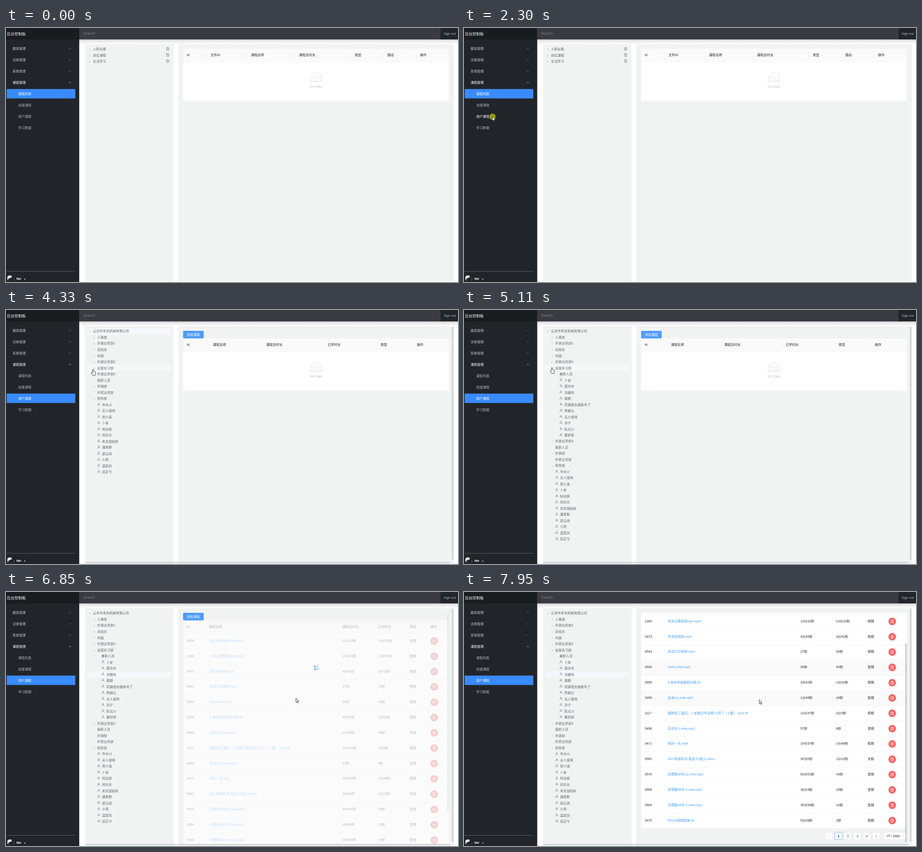
Animation, 998 px wide and 561 px high, one loop 8000 ms. Source, as an HTML page with a canvas:

```html
<!DOCTYPE html>
<html lang="zh-CN">
<head>
<meta charset="utf-8">
<title>后台控制板</title>
<style>
html, body { margin: 0; width: 100%; height: 100%; overflow: hidden; background: #fff; }
canvas { display: block; }
</style>
</head>
<body>
<canvas id="stage" width="998" height="561"></canvas>
<script>
const ctx = document.getElementById('stage').getContext('2d');
const LOOP = 8000;
const FONT = '"Liberation Sans", "Noto Sans CJK SC", "Noto Sans CJK", sans-serif';
const PAGE_SWITCH = 2360, TREE_READY = 2500, LOAD_START = 6180, DATA_READY = 6300, LOAD_END = 6910;
const ROW = 33.83, TREE_ROW = 13.52, TABLE_LEFT = 391, TABLE_RIGHT = 978;

const MENU = ['题库管理', '试卷管理', '答卷管理', '课程管理'];
const SUBMENU = ['课程列表', '创建课程', '用户课程', '学习数据'];

// Prefix: ">" has an arrow, "@" is a person, "-" is a plain node.
const DEPTS_TOP = ['>人事部', '>外销业务部1', '>总经办', '>内销', '>外销业务部2', '>运营实习部'];
const DEPTS_REST = ['>外销业务部3', '-离职人员', '>外销部', '-外贸业务部', '>财务部',
  '@岑木川', '@无人使用', '@贺小溪', '@卜安', '@柯远帆', '@闵乐乐', '@禾岚邹知秋',
  '@蒲青野', '@邵云阔', '@小荷', '@温若岚', '@田芷兮'];
const INTERNS = ['-兼职人员', '@卜安', '@龚亦舟', '@洪鹿鸣', '@裘朗', '@花姨借去做账号了',
  '@佟越山', '@无人使用', '@涂宁', '@阮北川', '@霍舒原'];

const COURSES = `3508|枕式和彩泥机.m4a.mp3|12分12秒|12分12秒|音频
1280|禾岚云鹭使用mp4.mp4|13分32秒|13分32秒|视频
3473|禾岚首视频.mp4|4分45秒|4分42秒|视频
3543|禾岚打印视频.mp4|27秒|26秒|视频
3500|Ovek.m4a.mp3|36秒|34秒|音频
3555|6.报关的金额和台数.flv|3分42秒|1分32秒|视频
3499|朵米(1).m4a.mp3|1分48秒|43秒|音频
1117|摆脱丢三落四，一定要记牢这两个窍门（上集）.mp3.flv|12分47秒|2分3秒|视频
3496|苏苏5(1).m4a.mp3|57秒|8秒|音频
3471|我的一天.mp4|19分37秒|1分48秒|视频
3561|002 快速拓词-发品-升星(1).docx|30分0秒|1分10秒|文档
3570|岚鹭路36号(1).m4a.mp3|56分51秒|43秒|音频
3569|岚鹭路36号 3.m4a.mp3|36分3秒|23秒|音频
3564|岚鹭路36号 5.m4a.mp3|39分56秒|16秒|音频
3476|PDCA逻辑思维.flv|5分28秒|2秒|视频`.split('\n').map(line => line.split('|'));

const LIST_COLS = [['Id', 399], ['文件ID', 451.5], ['课程名称', 541], ['课程总时长', 647],
  ['类型', 770], ['路径', 842], ['操作', 914]];
const EMPTY_COLS = [['Id', 399], ['课程名称', 457], ['课程总时长', 574.5], ['已学时长', 710],
  ['类型', 827], ['操作', 907]];
const DATA_COLS = [['Id', 399], ['课程名称', 448], ['课程总时长', 742.8], ['已学时长', 821.5],
  ['类型', 891], ['操作', 937]];

// Pointer moves: start, end, x, y
const MOVES = [[530, 860, 497, 324], [1320, 2100, 63, 196], [2500, 2920, 272, 62],
  [2920, 3280, 185, 44], [3930, 4330, 192, 131], [4450, 4650, 194, 127],
  [5380, 5920, 236, 181], [6480, 6910, 656, 237], [7240, 7370, 652, 238]];
const CLICKS = [[2160, 2360], [3410, 3540], [4780, 4900], [6120, 6240]];

const ARROW = new Path2D('M0 0V9L2.1 7.1 3.6 10.4 5 9.8 3.6 6.5H6.2Z');
const HAND = new Path2D('M-1.2 .8Q0-.6 1.2 .8V4.8L5 5.6Q6.4 6 6 8.2L5 11V13.2H-.8L-3.2 9Q-4 7-2.6 7L-1.2 8.4Z');
const TRAY_BACK = new Path2D('M55 13 44.5 1Q43.5 0 42.5 0H21.5Q20.5 0 19.5 1L9 13V22H55Z');
const TRAY_FRONT = new Path2D('M41.6 16Q41.6 13 44 13H55V31Q55 35 52 35H12Q9 35 9 31V13H20Q22.4 13 22.4 16T24.6 18.8H39.4Q41.6 18.8 41.6 16Z');

const clamp = v => Math.max(0, Math.min(1, v));
const ease = p => p < .5 ? 2 * p * p : 1 - 2 * (1 - p) * (1 - p);
const ramp = (t, start, length) => clamp((t - start) / length);

function rect(x, y, w, h, color) {
  ctx.fillStyle = color;
  ctx.fillRect(x, y, w, h);
}

function box(x, y, w, h, r, fill, border) {
  ctx.beginPath();
  ctx.roundRect(x, y, w, h, r);
  ctx.fillStyle = fill;
  ctx.fill();
  if (border) stroke(border, .6);
}

function stroke(color, width, path) {
  ctx.strokeStyle = color;
  ctx.lineWidth = width;
  path ? ctx.stroke(path) : ctx.stroke();
}

function line(color, width, ...points) {
  ctx.beginPath();
  for (let i = 0; i < points.length; i += 2) ctx.lineTo(points[i], points[i + 1]);
  stroke(color, width);
}

function disc(x, y, r, color) {
  ctx.beginPath();
  ctx.arc(x, y, r, 0, 7);
  ctx.fillStyle = color;
  ctx.fill();
}

function text(str, x, cy, color, size = 7.28, align = 'left', weight = '') {
  ctx.font = `${weight} ${size}px ${FONT}`;
  ctx.textAlign = align;
  ctx.fillStyle = color;
  ctx.fillText(str, x, cy + size * .36);
}

function clipped(x, y, w, h, draw) {
  ctx.save();
  ctx.beginPath();
  ctx.rect(x, y, w, h);
  ctx.clip();
  draw();
  ctx.restore();
}

function chevron(x, y, up, color, w = 2.4) {
  const d = up ? -w / 2 : w / 2;
  line(color, .8, x - w, y - d, x, y + d, x + w, y - d);
}

function triangle(x, y, turn, color, r = 1.8) {
  ctx.save();
  ctx.translate(x, y);
  ctx.rotate(turn * Math.PI / 2);
  ctx.beginPath();
  ctx.moveTo(-r * .6, -r);
  ctx.lineTo(r * .7, 0);
  ctx.lineTo(-r * .6, r);
  ctx.fillStyle = color;
  ctx.fill();
  ctx.restore();
}

function trash(x, y, color) {
  line(color, .7, x - 3.1, y - 2, x + 3.1, y - 2);
  line(color, .7, x - 1.2, y - 2, x - 1.2, y - 3.2, x + 1.2, y - 3.2, x + 1.2, y - 2);
  line(color, .7, x - 2.4, y - 2, x - 2.4, y + 3.1, x + 2.4, y + 3.1, x + 2.4, y - 2);
  line(color, .6, x - .8, y - .4, x - .8, y + 1.6);
  line(color, .6, x + .8, y - .4, x + .8, y + 1.6);
}

function person(x, y) {
  ctx.beginPath();
  ctx.arc(x, y - 1.4, 1.6, 0, 7);
  stroke('#6b6d71', .65);
  ctx.beginPath();
  ctx.arc(x, y + 3, 2.8, Math.PI, 0);
  stroke('#6b6d71', .65);
}

function pointer(t) {
  let x = 892, y = 549;
  for (const [start, end, toX, toY] of MOVES) {
    const p = ease(ramp(t, start, end - start));
    x += (toX - x) * p;
    y += (toY - y) * p;
  }
  return { x, y, shown: t >= 530 };
}

function drawSidebar(t, mouse) {
  rect(0, 0, 161.7, 561, '#212529');
  rect(0, 0, 161.7, 25.3, '#191c1f');
  text('后台控制板', 2, 12.7, '#fff', 8.32);
  MENU.forEach((label, i) => {
    const y = 45 + i * 25, open = i === 3;
    text(label, 14.5, y, open ? '#fff' : '#c3c5c7');
    chevron(141, y + .3, open, open ? '#d5d6d8' : '#85888c');
  });
  const active = t < PAGE_SWITCH ? 0 : 2;
  SUBMENU.forEach((label, i) => {
    const y = 145.2 + i * 24.9;
    const hover = mouse.shown && mouse.x < 153 && Math.abs(mouse.y - y) < 10.5;
    if (i === active) rect(1.5, y - 10.4, 151.5, 20.8, '#398bff');
    text(label, 27, y, i === active || hover ? '#fff' : '#b3b5b7');
  });
  rect(1.5, 537.3, 151.5, .7, '#75787b');
  ctx.beginPath();
  ctx.moveTo(3, 557);
  ctx.lineTo(3, 550);
  ctx.quadraticCurveTo(4, 546.5, 8, 546.5);
  ctx.lineTo(12.5, 547);
  ctx.lineTo(12.5, 551);
  ctx.quadraticCurveTo(6, 552, 3, 557);
  ctx.fillStyle = '#e4e7e6';
  ctx.fill();
  line('#8c9093', .8, 3, 557, 8, 556.5);
  text('|', 17, 554.5, '#b9bbbd', 6);
  text('tav', 23, 553.5, '#fff', 7.28, 'left', 'bold');
  triangle(41.5, 554.7, 1, '#fff', 1.7);
}

function drawTopbar() {
  const shade = ctx.createLinearGradient(0, 25, 0, 37);
  shade.addColorStop(0, 'rgba(20,20,40,.17)');
  shade.addColorStop(.5, 'rgba(20,20,40,.06)');
  shade.addColorStop(1, 'rgba(20,20,40,0)');
  rect(161.7, 25, 837, 12, shade);
  rect(161.7, 0, 796.5, 25.3, '#393b40');
  rect(958.2, 0, 40, 25.3, '#212529');
  text('Search', 170, 12.3, '#777a7f', 8.32);
  text('Sign out', 966.3, 12, '#b5b7b9');
}

function treeRow(node, y, level, turn, mouse, focused) {
  const x = 191.9 + level * 9.36, kind = node[0];
  const hover = mouse.x > 180 && mouse.x < 365 && Math.abs(mouse.y - y) < TREE_ROW / 2;
  if (hover || focused) rect(179.5, y - TREE_ROW / 2, 185.5, TREE_ROW, '#f5f7fa');
  if (kind === '>') triangle(x - 6.3, y + .8, turn, '#b4b8c0');
  if (kind === '@') person(x + 3.5, y - .5);
  text(node.slice(1), x + (kind === '@' ? 10.8 : 0), y, '#606266');
}

function drawTree(t, mouse) {
  rect(174, 36, 196, 524, '#f1f3f3');
  const top = 46.8;
  if (t < PAGE_SWITCH) {
    ['>入职必看', '>岗位课程', '>生活学习'].forEach((node, i) => {
      treeRow(node, top + i * TREE_ROW, 0, 0, mouse);
      trash(357, top - .7 + i * TREE_ROW, '#707276');
    });
    return;
  }
  if (t < TREE_READY) return;
  const rootOpen = ease(ramp(t, 3390, 300)), internOpen = ease(ramp(t, 4825, 300));
  const focus = t < 3410 ? '' : t < 4780 ? 'root' : t < 6120 ? 'interns' : 'person';
  const innerHeight = INTERNS.length * TREE_ROW * internOpen;
  const fullHeight = (DEPTS_TOP.length + DEPTS_REST.length) * TREE_ROW + innerHeight;
  treeRow('>云沐市禾岚机械有限公司', top, 0, rootOpen, mouse, focus === 'root');
  const childTop = top + TREE_ROW / 2;
  clipped(174, childTop, 196, fullHeight * rootOpen, () => {
    DEPTS_TOP.forEach((node, i) => {
      const last = i === DEPTS_TOP.length - 1;
      treeRow(node, top + (i + 1) * TREE_ROW, 1, last ? internOpen : 0, mouse, last && focus === 'interns');
    });
    const innerTop = childTop + DEPTS_TOP.length * TREE_ROW;
    clipped(174, innerTop, 196, innerHeight, () => INTERNS.forEach((node, i) =>
      treeRow(node, innerTop + (i + .5) * TREE_ROW, 2, 0, mouse, i === 3 && focus === 'person')));
    DEPTS_REST.forEach((node, i) =>
      treeRow(node, innerTop + innerHeight + (i + .5) * TREE_ROW, 1, 0, mouse));
  });
}

function tableHeader(cols, top) {
  rect(TABLE_LEFT, top, TABLE_RIGHT - TABLE_LEFT, 28.8, '#fafafa');
  rect(TABLE_LEFT, top + 28.3, TABLE_RIGHT - TABLE_LEFT, .6, '#efefef');
  cols.forEach(([label, x], i) => {
    text(label, x, top + 13.3, '#262626');
    if (i) rect(x - 8.7, top + 8.3, .6, 11.5, '#e6e6e6');
  });
}

function emptyTable(cols, top) {
  rect(TABLE_LEFT, top, TABLE_RIGHT - TABLE_LEFT, 115, '#fff');
  tableHeader(cols, top);
  ctx.save();
  ctx.translate(667.9, top + 53.5);
  ctx.scale(.52, .52);
  ctx.beginPath();
  ctx.ellipse(32, 33, 32, 7, 0, 0, 7);
  ctx.fillStyle = '#f5f5f5';
  ctx.fill();
  stroke('#d9d9d9', 1.1, TRAY_BACK);
  ctx.fillStyle = '#fafafa';
  ctx.fill(TRAY_FRONT);
  stroke('#d9d9d9', 1.1, TRAY_FRONT);
  ctx.restore();
  text('No Data', 684.7, top + 83.4, '#bfbfbf', 7.28, 'center');
}

function pager(y) {
  ['', '1', '2', '3', '4', ''].forEach((label, i) => {
    const x = 798 + i * 20.8, current = i === 1;
    box(x, y - 8.2, 16.2, 16.4, 1, '#fff', current ? '#1890ff' : '#d9d9d9');
    if (label) text(label, x + 8.1, y + .4, current ? '#1d1d1d' : '#333', 7.28, 'center', current ? 'bold' : '');
    else {
      const d = i ? 1.2 : -1.2;
      line(i ? '#444' : '#c4c4c4', .8, x + 8.1 - d, y - 1.4, x + 8.1 + d, y + 1, x + 8.1 - d, y + 3.4);
    }
  });
  box(926.5, y - 8.2, 53, 16.4, 1, '#fff', '#d9d9d9');
  text('15 / page', 932.8, y, '#333');
  chevron(969, y + .3, false, '#c0c0c0');
}

function dataTable(t, scroll) {
  const top = 63, bodyTop = top + 28.6, width = TABLE_RIGHT - TABLE_LEFT;
  rect(TABLE_LEFT, top - scroll, width, 28.6 + ROW * COURSES.length, '#fff');
  tableHeader(DATA_COLS, top - scroll);
  COURSES.forEach(([id, name, total, learned, type], i) => {
    const y = bodyTop + i * ROW - scroll, cy = y + 15.7;
    if ((i === 4 && t > 6900) || (i === 6 && t > 7800)) rect(TABLE_LEFT, y, width, ROW, '#fafafa');
    rect(TABLE_LEFT, y + ROW - .6, width, .6, '#efefef');
    text(id, 399, cy, '#262626');
    text(name, 449.7, cy, '#409eff');
    text(total, 742.8, cy, '#262626');
    text(learned, 821.5, cy, '#262626');
    text(type, 891, cy, '#262626');
    disc(945.5, y + 16.6, 8.4, '#ef6a68');
    trash(945.5, y + 16.6, '#fff');
  });
  pager(615.7 - scroll);
}

function spinner(t, alpha) {
  ctx.save();
  ctx.globalAlpha = alpha;
  ctx.translate(684.8, 167.2);
  ctx.rotate((t - 6390) / 1200 * Math.PI * 2 - .24);
  for (let i = 0; i < 4; i++) {
    const glow = .65 + .3 * Math.sin(t / 320 + i * Math.PI / 2);
    ctx.rotate(Math.PI / 2);
    disc(4.1, 0, 2.1, `rgba(64,150,255,${glow})`);
  }
  ctx.restore();
}

function drawPanel(t) {
  rect(380.5, 36, 608.5, 524, '#f1f3f3');
  if (t < PAGE_SWITCH) return emptyTable(LIST_COLS, 46);
  const progress = ease(ramp(t, 7600, 350)), scroll = 77 * progress;
  clipped(TABLE_LEFT, 46, TABLE_RIGHT - TABLE_LEFT, 511, () => {
    t < DATA_READY ? emptyTable(EMPTY_COLS, 63) : dataTable(t, scroll);
    const loading = ramp(t, LOAD_START, 200) * (1 - ramp(t, LOAD_END, 150));
    if (loading) {
      rect(TABLE_LEFT, 63, TABLE_RIGHT - TABLE_LEFT, 494, `rgba(249,250,249,${.7 * loading})`);
      spinner(t, loading);
    }
    box(TABLE_LEFT, 46 - scroll, 45.5, 16.8, 2, '#509cff');
    text('添加课程', 413.8, 54.3 - scroll, '#fff', 7.28, 'center');
  });
  const thumb = ramp(t, 6750, 340);
  if (thumb) box(974.2, 47 + 66 * progress, 3.4, 440, 1.7, `rgba(144,147,153,${.45 * thumb})`);
}

function drawScrollbars(t) {
  const alpha = t < 2695 ? ramp(t, 530, 340) * (1 - ramp(t, 1850, 120)) : ramp(t, 2695, 340);
  if (!alpha) return;
  const color = `rgba(144,147,153,${.33 * alpha})`;
  box(984.6, 37, 3.3, 515, 1.6, color);
  box(174.5, 556.2, 806.5, 3.2, 1.6, color);
}

function drawPointer(t, { x, y, shown }) {
  if (!shown) return;
  if (CLICKS.some(([from, to]) => t >= from && t < to)) disc(x, y, 7, 'rgba(255,245,0,.55)');
  const shape = t > TREE_READY && x > 180 && x < 366 ? HAND : ARROW;
  ctx.save();
  ctx.translate(x, y);
  ctx.lineJoin = 'round';
  ctx.fillStyle = '#fff';
  ctx.fill(shape);
  stroke('#111', .8, shape);
  ctx.restore();
}

function frame() {
  const t = performance.now() % LOOP, mouse = pointer(t);
  rect(0, 0, 998, 561, '#fff');
  drawTree(t, mouse);
  drawPanel(t);
  drawScrollbars(t);
  drawTopbar();
  drawSidebar(t, mouse);
  drawPointer(t, mouse);
  requestAnimationFrame(frame);
}
frame();
</script>
</body>
</html>
```
